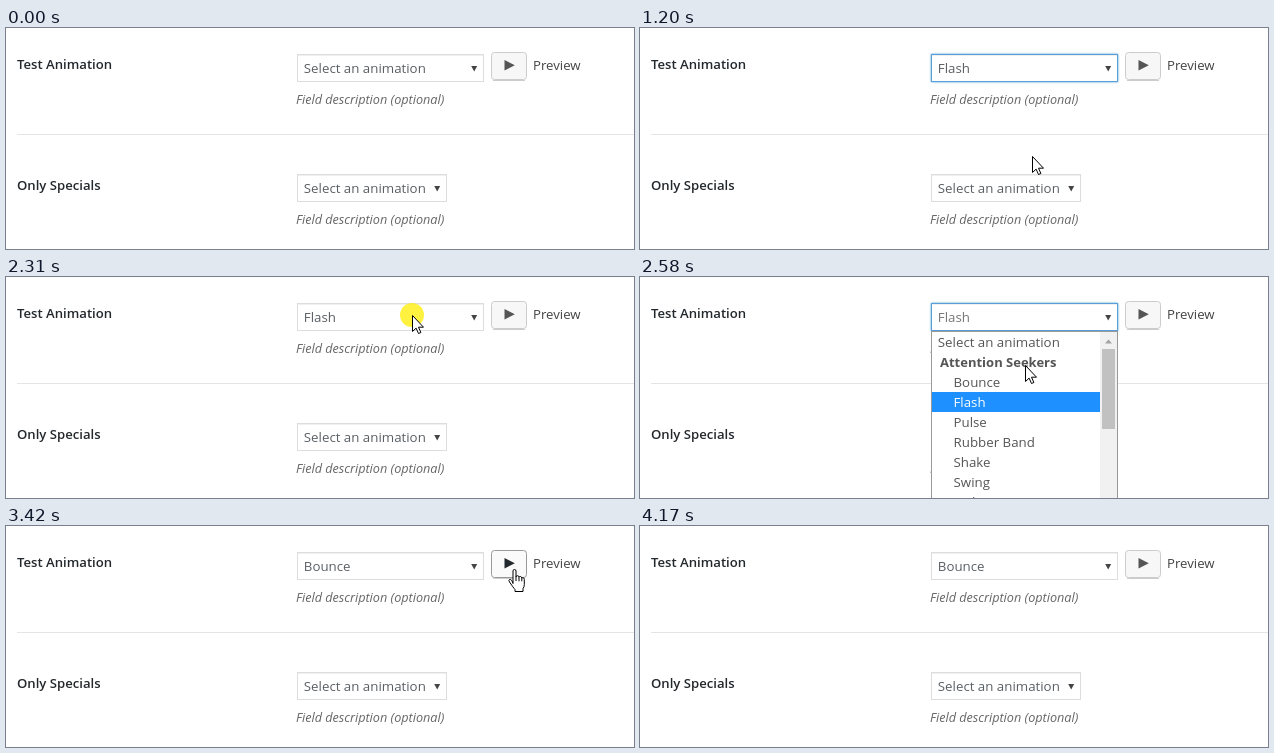
Write an HTML page that moves like this. It is 628 by 221 pixels and loops after 4.62 s.

```html
<!DOCTYPE html>
<html lang="en">
<head>
<meta charset="utf-8">
<title>Animation field</title>
<style>
  html, body { margin: 0; width: 100%; height: 100%; overflow: hidden; background: #fff; }
  svg { display: block; font: 13.3px "Open Sans", "Noto Sans", sans-serif; fill: #5a5f64; }
  .label { font-size: 13.15px; font-weight: 600; fill: #23282d; }
  .note { font-size: 12.68px; font-style: italic; fill: #666; }
  .box { fill: #fff; stroke: #ddd; }
  .focus { stroke: #5b9dd9; filter: drop-shadow(0 0 1px rgba(30, 140, 190, .8)); }
  .arrow { fill: #444; }
  #button rect { fill: #f7f7f7; stroke: #ccc; }
  #button path { fill: #555; }
  #button.hover rect { fill: #fafafa; stroke: #999; }
  #button.hover path { fill: #23282d; }
  #preview { font-size: 13.2px; fill: #444; }
  #rows { fill: #555; }
  .group { font-size: 13px; font-weight: 700; }
  .on { fill: #fff; }
  #pointer path { fill: #fff; stroke: #000; stroke-linejoin: round; }
</style>
</head>
<body>
<svg width="628" height="221" viewBox="0 0 628 221">
  <path d="M11 106.5H628" stroke="#e5e5e5"/>

  <text class="label" x="11" y="41">Test Animation</text>
  <rect id="select" class="box" x="291.5" y="26.5" width="186" height="27"/>
  <path d="M292 27.5H477" stroke="#f0f0f0"/>
  <text id="value" x="297.8" y="45"></text>
  <path class="arrow" d="M465.2 38h6l-3 5.5z"/>
  <text class="note" x="290" y="76">Field description (optional)</text>

  <g id="button">
    <path d="M487 52.5H519" stroke="#ccc"/>
    <rect x="485.5" y="24.5" width="35" height="27" rx="3"/>
    <path d="M498.5 32v10.6l10.3-5.3z"/>
  </g>
  <text id="preview" x="527" y="42">Preview</text>

  <text class="label" x="11" y="162">Only Specials</text>
  <rect class="box" x="291.5" y="146.5" width="149" height="27"/>
  <path d="M292 147.5H440" stroke="#f0f0f0"/>
  <text x="297.8" y="165">Select an animation</text>
  <path class="arrow" d="M428.2 158h6l-3 5.5z"/>
  <text class="note" x="290" y="196">Field description (optional)</text>

  <g id="list">
    <rect x="291.5" y="54.5" width="186" height="180" fill="#fff" stroke="#999"/>
    <rect id="mark" x="292" width="168" height="20" fill="#1e90ff"/>
    <g id="rows"></g>
    <rect x="460" y="55" width="17" height="170" fill="#f1f1f1"/>
    <rect x="462" y="72" width="13" height="80" fill="#c1c1c1"/>
    <path d="M465 66.5h7l-3.5-4z" fill="#a3a3a3"/>
  </g>

  <g id="pointer">
    <circle id="press" r="12" fill="#ffee10" fill-opacity=".8"/>
    <path id="plain" d="M.5 .5V16.5L4.1 13.1 6.5 18.5 8.9 17.5 6.5 12.2H11.5Z"/>
    <path id="hand" transform="translate(-7.5)" d="M6.5 14.5V2Q6.5 .5 8 .5 9.5 .5 9.5 2V8Q9.5 6.7 11 6.7
      12.5 6.7 12.5 8.3 12.7 7.3 14 7.5 15.3 7.7 15.3 9.3 15.6 8.5 16.6 8.7 17.8 9 17.8 10.5V15.5
      Q17.8 18 16.5 19.5V22.5H8.5V20.5Q7.5 19.5 6 17.3L3 13Q1.8 11.2 3 10.5 4.2 10 5.3 11.5Z
      M9.5 8v4M12.5 8.3v4M15.3 9.3v3"/>
  </g>
</svg>
<script>
const LOOP = 4620, STEP = 30, EFFECT = 800;
const $ = id => document.getElementById(id);
const show = (id, on) => $(id).style.display = on ? "" : "none";
const within = (t, spans) => spans.some(([from, to]) => t >= from && t < to);

const names = ["Select an animation", "Attention Seekers", "Bounce", "Flash", "Pulse",
  "Rubber Band", "Shake", "Swing", "Tada"];
const rowTop = i => 55 + 20 * i;
const rows = names.map((name, i) => {
  const row = document.createElementNS("http://www.w3.org/2000/svg", "text");
  row.setAttribute("x", [297.8, 300][i] ?? 313.5);
  row.setAttribute("y", rowTop(i) + 15);
  row.textContent = name;
  if (i === 1) row.classList.add("group");
  return $("rows").appendChild(row);
});

// Pointer stops: time, x, y
const path = [
  [150, 440, 222], [420, 408, 40], [660, 408, 40], [960, 392, 126], [1170, 392, 128],
  [1200, 392, 128], [1410, 508, 43], [1860, 508, 43], [2280, 406, 38], [2400, 406, 38],
  [2670, 378, 106], [2910, 378, 106], [3300, 508, 43], [3815, 508, 43], [4140, 453, 149]
];
const presses = [[420, 510], [1080, 1170], [1410, 1500], [2310, 2370], [2760, 2850], [3300, 3420]];
const opened = [[450, 1200], [2370, 2880]];
const focused = [[420, 1410], [2340, 3300]];

function pointerAt(t) {
  const next = path.findIndex(stop => stop[0] > t);
  if (next < 1) return (next ? path.at(-1) : path[0]).slice(1);
  const [a, b] = [path[next - 1], path[next]];
  const u = (t - a[0]) / (b[0] - a[0]), s = u * u * (3 - 2 * u);
  return [1, 2].map(k => Math.round(a[k] + (b[k] - a[k]) * s));
}

// Preview effects, driven by the clock below
const land = "cubic-bezier(.215,.61,.355,1)", leap = "cubic-bezier(.755,.05,.855,.06)";
const lift = (offset, y, easing) => ({ offset, transform: `translateY(${y}px)`, easing });
const effect = (start, frames) => {
  const player = $("preview").animate(frames, EFFECT);
  player.pause();
  return { start, player };
};
const effects = [
  effect(1470, [1, 0, 1, 0, 1].map(opacity => ({ opacity, easing: "ease" }))),
  effect(3370, [lift(0, 0, land), lift(.2, 0, land), lift(.4, -30, leap), lift(.43, -30, leap),
    lift(.53, 0, land), lift(.7, -15, leap), lift(.8, 0, land), lift(.9, -4, "ease"), lift(1, 0, land)])
];

function draw(now) {
  const t = Math.floor(now % LOOP / STEP) * STEP;
  const [x, y] = pointerAt(t);
  const visible = t >= 150 && t < 4170;
  const open = within(t, opened);
  const chosen = t < 1200 ? 0 : t < 2880 ? 3 : 2;

  $("value").textContent = names[chosen];
  $("value").style.fill = open ? "#777" : "";
  $("select").classList.toggle("focus", within(t, focused));

  const under = Math.floor((y - 55) / 20);
  const active = under < 0 || under === 1 ? chosen : under;
  show("list", open);
  $("mark").setAttribute("y", rowTop(active));
  rows.forEach((row, i) => row.classList.toggle("on", i === active));

  const hover = visible && x >= 485 && x < 521 && y >= 24 && y < 53;
  $("button").classList.toggle("hover", hover);
  show("pointer", visible);
  show("press", within(t, presses));
  show("hand", hover);
  show("plain", !hover);
  $("pointer").setAttribute("transform", `translate(${x} ${y})`);

  for (const { start, player } of effects) player.currentTime = t - start;
  requestAnimationFrame(draw);
}
requestAnimationFrame(draw);
</script>
</body>
</html>
```
